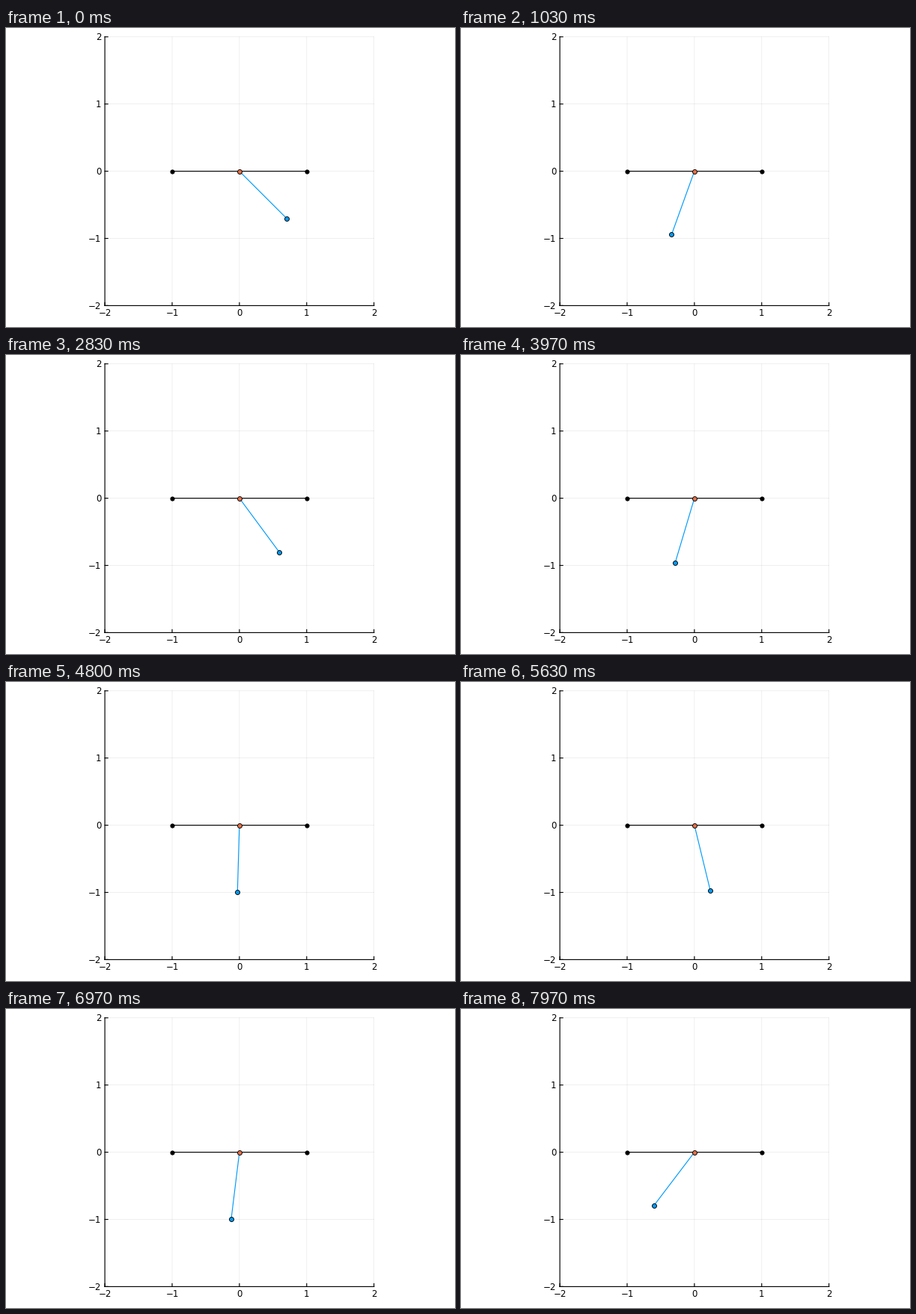
These frames come from a looping animation (600x400 px, 8000 ms). A matplotlib script:

```python
import math

import matplotlib.pyplot as plt
from matplotlib.animation import FuncAnimation

W, H, DPI = 600, 400, 100
FRAMES, LOOP_MS = 240, 8000
PX = 72 / DPI                      # one pixel in points
CX, CY, UNIT = 311.9, 191.6, 89.9  # origin and scale in pixels
BLUE, ORANGE = "#009afa", "#e36f47"
SWING = math.pi / 4
PERIOD = 44.228                    # frames per full swing

plt.rcParams["font.family"] = "DejaVu Sans"
fig = plt.figure(figsize=(W / DPI, H / DPI), dpi=DPI, facecolor="white")
ax = fig.add_axes([0, 0, 1, 1])
ax.set_xlim(0, W)
ax.set_ylim(H, 0)
ax.axis("off")


def px(x, y):
    return CX + UNIT * x, CY - UNIT * y


def line(x0, y0, x1, y1, color="black", width=1.15, **kw):
    return ax.plot([x0, x1], [y0, y1], color=color, lw=width * PX,
                   snap=False, **kw)[0]


def dot(x, y, color, z):
    return ax.plot([x], [y], "o", ms=6 * PX, mfc=color, mec="black",
                   mew=0.9 * PX, snap=False, zorder=z)[0]


def angle(frame):
    """Pendulum swing with its first anharmonic correction."""
    p = 2 * math.pi * frame / PERIOD
    eps = SWING ** 2 / 192
    return SWING * (math.cos(p) + eps * (math.cos(p) - math.cos(3 * p)))


left, bottom = px(-2, -2)
right, top = px(2, 2)

for v in range(-2, 3):
    x, y = px(v, v)
    line(x, top, x, bottom, width=0.6, alpha=0.1, zorder=1)
    line(left, y, right, y, width=0.6, alpha=0.1, zorder=1)
    line(x, bottom, x, bottom - 4, zorder=2)
    line(left, y, left + 4, y, zorder=2)
    label = str(v).replace("-", "\u2212")
    size = 11.7 * PX
    ax.text(x, 385.3, label, size=size, ha="center", va="baseline")
    ax.text(127.2, y + 4.3, label, size=size, ha="right", va="baseline")

line(left, top, left, bottom, zorder=2, solid_capstyle="projecting")
line(left, bottom, right, bottom, zorder=2, solid_capstyle="projecting")

# Rail with its end stops
line(*px(-1, 0), *px(1, 0), zorder=3)
for end in (-1, 1):
    dot(*px(end, 0), "black", 4).set_markersize(5.2 * PX)

rod = line(CX, CY, CX, CY, color=BLUE, zorder=5)
bob = dot(CX, CY, BLUE, 6)
dot(CX, CY, ORANGE, 7)


def draw(frame):
    a = angle(frame)
    x, y = px(math.sin(a), -math.cos(a))
    rod.set_data([CX, x], [CY, y])
    bob.set_data([x], [y])
    return rod, bob


anim = FuncAnimation(fig, draw, frames=FRAMES, interval=LOOP_MS / FRAMES,
                     repeat=True, repeat_delay=0)
plt.show()
```
